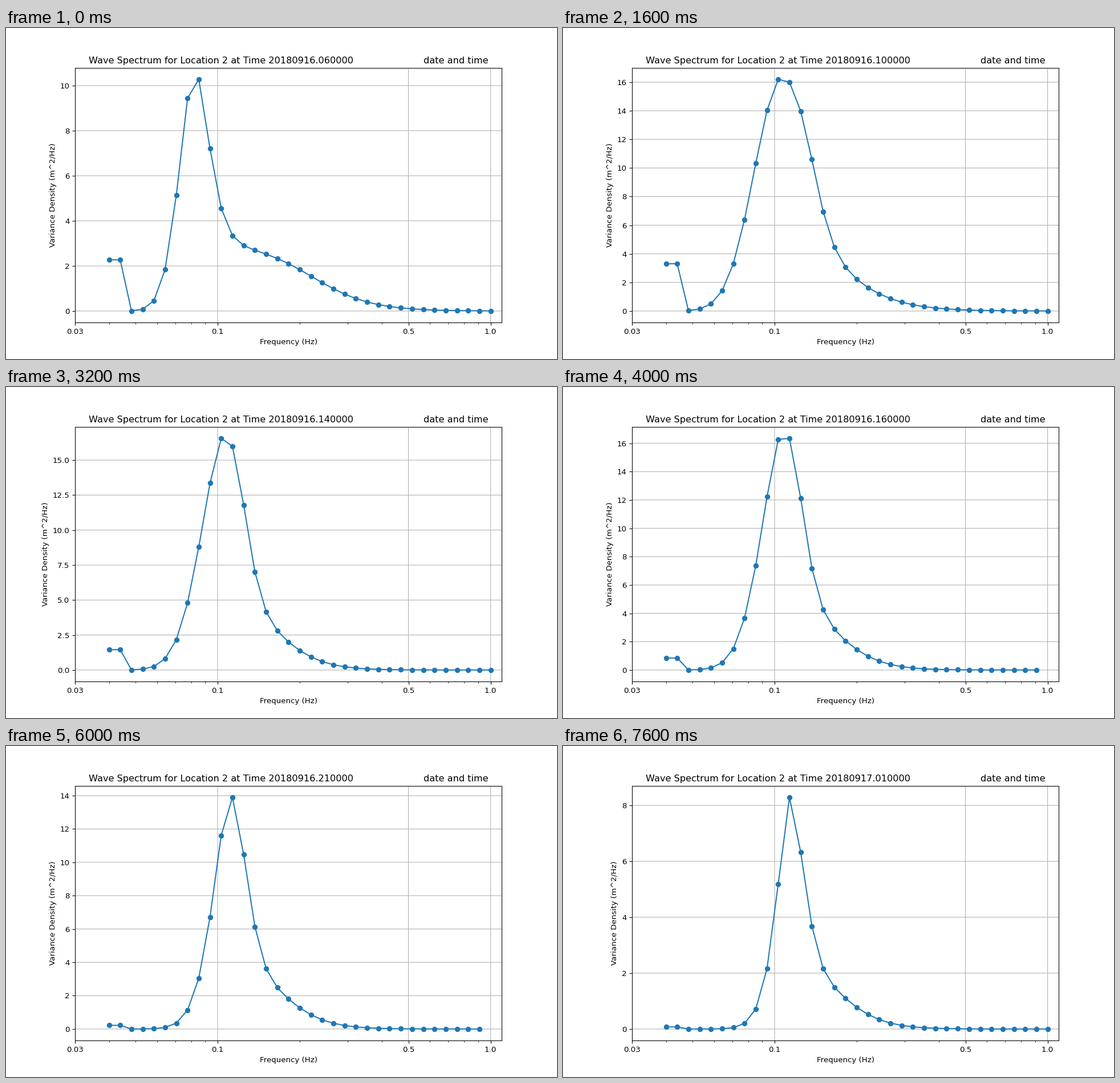
A matplotlib script that plays this animation: 966x580 px, repeating every 8 s.

```python
import numpy as np
import matplotlib.pyplot as plt
from matplotlib.animation import FuncAnimation
from matplotlib.ticker import NullFormatter

WIDTH, HEIGHT, DPI = 966, 580, 96
FRAMES, INTERVAL = 20, 400
FIRST_HOUR = 6
POINTS = 35
BINS = np.arange(POINTS)
FREQUENCY = np.geomspace(0.04, 1.0, POINTS)
STAGES = [6, 10, 14, 25]  # hours: growth, fully risen, settled, decayed


def ease(hour, values, hours=STAGES):
    return np.interp(hour, hours, values)


def ease_log(hour, values, hours=STAGES):
    return np.exp(np.interp(hour, hours, np.log(values)))


def falloff(center, width):
    return 1 / (1 + np.exp((BINS - center) / width))


def peak_density(hour):
    return ease_log(hour, [10.28, 17.2, 16.2, 16.56, 16.35, 15.23, 13.9, 8.29],
                    [6, 8, 10, 14, 16, 19, 21, 25])


def wind_sea(hour):
    """Steep rise up to the crest, then a main drop with a broad shoulder."""
    below_crest = np.maximum(ease(hour, [8, 11, 11, 11]) - BINS, 0)
    steepness = ease_log(hour, [.24, .045, .08, .55])
    rise = np.exp(-steepness * below_crest ** ease(hour, [1.9, 2.25, 2.05, 1.4]))

    share = ease(hour, [.295, .4, .29, .33])
    drop = falloff(ease(hour, [8.8, 13.1, 12.15, 12.3]),
                   ease(hour, [.75, .9, .75, .65]))
    shoulder = falloff(ease(hour, [18.1, 15.5, 15.5, 15.5]),
                       ease(hour, [2.6, 2.6, 1.9, 1.9]))
    shape = rise * ((1.25 - share) * drop + share * shoulder)
    return peak_density(hour) * shape / shape.max()


def spectrum(hour):
    density = wind_sea(hour)
    density[:2] += ease_log(hour, [2.27, 3.3, 1.45, .075])  # long swell
    if 16 <= hour <= 21:  # the highest bin has no value here
        density[-1] = np.nan
    return density


plt.rcParams.update({"font.family": "DejaVu Sans", "font.size": 10.0625})
fig, ax = plt.subplots(figsize=(WIDTH / DPI, HEIGHT / DPI), dpi=DPI)
line, = ax.plot(FREQUENCY, spectrum(FIRST_HOUR), "o-", color="#1f77b4",
                snap=False)
ax.set_xscale("log")
ax.set_xticks([0.03, 0.1, 0.5, 1.0], labels=["0.03", "0.1", "0.5", "1.0"])
ax.xaxis.set_minor_formatter(NullFormatter())
ax.set_xlim(0.03, 1.1)
ax.set_xlabel("Frequency (Hz)")
ax.set_ylabel("Variance Density (m^2/Hz)")
ax.grid(True, snap=False)


def update(frame):
    hour = FIRST_HOUR + frame
    peak = peak_density(hour)
    line.set_ydata(spectrum(hour))
    ax.set_ylim(-0.05 * peak, 1.05 * peak)
    stamp = f"201809{16 + hour // 24}.{hour % 24:02d}0000"
    ax.set_title(f"Wave Spectrum for Location 2 at Time {stamp}"
                 + " " * 24 + "date and time")
    return line,


anim = FuncAnimation(fig, update, frames=FRAMES, interval=INTERVAL,
                     init_func=lambda: update(0), repeat=True, repeat_delay=0)
plt.show()
```
